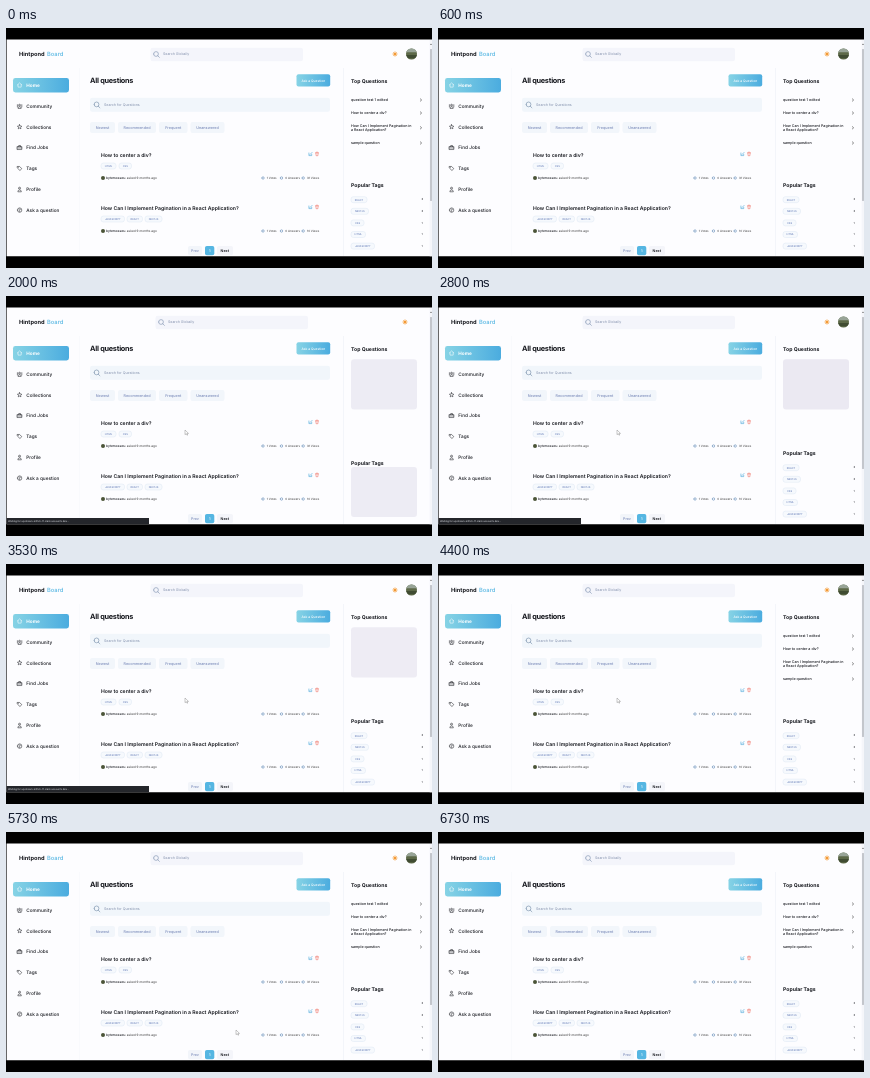
Write an HTML page that moves like this. It is 426 by 240 pixels and loops after 6.79 s.

```html
<!DOCTYPE html>
<html lang="en">
<head>
<meta charset="utf-8">
<title>Question board loading</title>
<style>
  html, body { margin: 0; width: 100%; height: 100%; overflow: hidden; background: #000; }
  svg { display: block; width: 100%; height: 100%; }
  text { font-family: Inter, sans-serif; text-rendering: geometricPrecision; white-space: pre; }
  .icon { fill: none; stroke-width: .6; stroke-linecap: round; stroke-linejoin: round; }
</style>
</head>
<body>
<svg id="stage" viewBox="0 0 426 240"></svg>
<script>
const LOOP = 6790;
const INK = '#15171d', BLUE = '#55b6e2', PAPER = '#fdfdff';

const text = (x, y, s, size, weight = 500, fill = INK, extra = '') =>
  `<text x="${x}" y="${y}" font-size="${size}" font-weight="${weight}" fill="${fill}" ${extra}>${s}</text>`;
const centred = (x, y, s, size, weight, fill) => text(x, y, s, size, weight, fill, 'text-anchor="middle"');
const box = (x, y, w, h, fill, r = 0, extra = '') =>
  `<rect x="${x}" y="${y}" width="${w}" height="${h}" rx="${r}" fill="${fill}" ${extra}/>`;
const icon = (x, y, d, color = '#333', size = 1) =>
  `<path class="icon" transform="translate(${x} ${y}) scale(${size})" d="${d}" stroke="${color}"/>`;
const group = (id, body) => `<g id="${id}">${body}</g>`;

const ring = r => `M${-r} 0a${r} ${r} 0 1 0 ${2 * r} 0a${r} ${r} 0 1 0 ${-2 * r} 0`;
const lens = ring(2.4) + 'M1.8 1.8L3.4 3.4';

function pill(x, y, w, label) {
  return box(x, y, w, 6, '#f6f9fd', 2.4, 'stroke="#dde6f2" stroke-width=".5"') +
    centred(x + w / 2, y + 3.95, label, 2.55, 500, '#7187bd');
}

function menu() {
  const items = [
    ['Home', 57, 'M-2.5 0L0-2.4L2.5 0M-1.8-.5V2.4H1.8V-.5'],
    ['Community', 78, 'M-1-1a1 1 0 1 0 2 0a1 1 0 1 0-2 0M-1.8 2.3V1.5Q0 0 1.8 1.5V2.3ZM-2.5-1.5V1M2.5-1.5V1'],
    ['Collections', 98.8, 'M0-2.4L.8-.8L2.5-.6L1.2.6L1.5 2.3L0 1.4L-1.5 2.3L-1.2.6L-2.5-.6L-.8-.8Z'],
    ['Find Jobs', 119.6, 'M-2.5-1.2H2.5V2.2H-2.5ZM-1-1.2V-2.4H1V-1.2M-2.5.4H2.5'],
    ['Tags', 140.4, 'M-2.4-2.2H0L2.5.3L.4 2.4L-2.4-.3ZM-1.4-1.2h.1'],
    ['Profile', 161.3, 'M-1.1-1.3a1.1 1.1 0 1 0 2.2 0a1.1 1.1 0 1 0-2.2 0M-2 2.4Q-2 .7 0 .7T2 2.4Z'],
    ['Ask a question', 182.1, ring(2.5) + 'M-.8-.7Q0-1.8.8-.7Q.8 0 0 .4M0 1.4v.1']
  ];
  return box(7, 50, 56, 14.4, 'url(#blue)', 2.4) + items.map(([label, y, d], i) => {
    const color = i ? INK : '#fff';
    return icon(13.6, y, d, color, .88) + text(20.3, y + 1.7, label, 4.7, i ? 500 : 700, color);
  }).join('');
}

function question(y, title, tags, stats) {
  const info = [[257, `${stats[0]} Votes`], [275.5, `${stats[1]} Answers`], [297.2, `${stats[2]} Views`]];
  return text(95, y + 1.9, title, 5.13, 600) +
    icon(304.5, y - 1, 'M-1.6-1V1.6H1.2V.3M-.6.6L1.6-1.6', '#48a6d8') +
    icon(311, y - 1, 'M-1.5-1.1H1.5M-1.1-1.1L-.9 1.7H.9L1.1-1.1M-.5-1.8H.5', '#ef7469') +
    tags.map(([x, w, s]) => pill(x, y + 8, w, s)).join('') +
    `<circle cx="97" cy="${y + 23}" r="2" fill="#4b5438"/>` +
    text(100, y + 24.1, 'bytemosses', 3.25, 500) +
    text(118.2, y + 24.1, '• asked 9 months ago', 3.15, 400, '#333') +
    info.map(([x, s]) =>
      icon(x, y + 23, ring(1.2), '#5f89b6') + text(x + 3.8, y + 24.1, s, 2.95, 400, '#333')).join('');
}

function topQuestions() {
  const rows = [
    [72, 'question test 1 edited'], [85, 'How to center a div?'],
    [97.3, 'How Can I Implement Pagination in'], [115, 'sample question']
  ];
  return rows.map(([y, s], i) => text(345, y + 1.2, s, 3.65) +
    icon(415, y + (i === 2 ? 2.5 : 0), 'M-.6-1.1L.6 0L-.6 1.1')).join('') +
    text(345, 103, 'a React Application?', 3.65);
}

const popularTags = () =>
  [['REACT', 16], ['NEXTJS', 17.5], ['CSS', 13], ['HTML', 14.5], ['JAVASCRIPT', 23.5]]
    .map(([s, w], i) => pill(345, 168.7 + i * 11.6, w, s) + text(415.5, 172.3 + i * 11.6, i < 2 ? 2 : 1, 2.8, 400)).join('');

const filters = () =>
  [[84, 25, 'Newest'], [112, 38, 'Recommended'], [153, 28.5, 'Frequent'], [184.5, 34, 'Unanswered']]
    .map(([x, w, s]) => box(x, 94, w, 11, '#f2f6fb', 2) + centred(x + w / 2, 100.8, s, 3.75, 500, '#7d8dbb')).join('');

const rays = Array.from({ length: 8 }, (_, i) => {
  const c = Math.cos(i * Math.PI / 4), s = Math.sin(i * Math.PI / 4);
  return `M${1.7 * c} ${1.7 * s}L${2.3 * c} ${2.3 * s}`;
}).join('');

const skeleton = (id, x, y, w, h) => box(x, y, w, h, '#ebe9f2', 3, `id="${id}" class="skeleton"`);

stage.innerHTML = `
  <defs>
    <linearGradient id="blue"><stop stop-color="#86d3e5"/><stop offset="1" stop-color="#4bacdf"/></linearGradient>
    <clipPath id="page"><rect x=".6" y="11.6" width="425.4" height="216.7"/></clipPath>
  </defs>
  <rect width="426" height="240"/>
  <g clip-path="url(#page)">` +
  box(0, 11, 426, 218, PAPER) +
  box(73, 40, .4, 188, '#f3f4f9') +
  text(13, 28, 'Hintpond', 5.7, 700) + text(41, 28, 'Board', 5.8, 500, BLUE) +
  group('globalSearch', box(144.5, 19.7, 152.5, 13.6, '#f4f5fb', 2.2) +
    icon(150, 26, lens, '#7b8fae') + text(157, 27.3, 'Search Globally', 3.55, 400, '#8390ac')) +
  group('theme',
    group('sun', '<circle r="1.5" fill="#f49a35"/>' + icon(0, 0, rays, '#f49a35')) +
    group('moon', '<path d="M1-2.2A2.4 2.4 0 1 1-2.3.8A2.8 2.8 0 0 0 1-2.2" fill="#ef8c35"/>')) +
  group('avatar', '<circle cx="405.5" cy="26" r="5.5" fill="#5d6948"/>' +
    '<path d="M400.3 24.2A5.5 5.5 0 0 1 410.7 24.2Z" fill="#98a497"/><path d="M400.1 27H410.9A5.5 5.5 0 0 1 409 30.2H402Z" fill="#404c32"/>') +
  menu() +
  group('header',
    text(84, 55.2, 'All questions', 7.3, 700, INK, 'letter-spacing="-.25"') +
    group('ask', box(290.5, 46.2, 33.7, 12.2, 'url(#blue)', 2) +
      centred(307.3, 53.5, 'Ask a Question', 3.3, 500, '#fff')) +
    box(84, 69.7, 240, 14, '#f1f6fb', 2.2, 'id="mainSearch"') +
    icon(90.5, 76.4, lens, '#7088a5') + text(98, 78, 'Search for Questions', 3.6, 400, '#8390ac') +
    filters()) +
  group('questions',
    question(127, 'How to center a div?', [[95, 15, 'HTML'], [113, 12.5, 'CSS']], [1, 0, 31]) +
    question(180, 'How Can I Implement Pagination in a React Application?',
      [[95, 23.5, 'JAVASCRIPT'], [121, 15.5, 'REACT'], [139, 17, 'NEXTJS']], [1, 0, 10]) +
    box(182, 218, 14, 9.3, '#f2f5fa', 1.8) + centred(189, 223.9, 'Prev', 3.65, 500, '#7d8dbb') +
    box(199, 218, 9.3, 9.3, BLUE, 1.8) + centred(203.7, 223.9, '1', 3.6, 600, '#fff') +
    box(211, 218, 16, 9.3, '#f4f5fa', 1.8) + centred(218.8, 223.9, 'Next', 3.7, 600)) +
  group('cards', skeleton('cardA', 84, 111.3, 244, 49.7) + skeleton('cardB', 84, 166.8, 244, 49.6)) +
  group('aside', box(337, 40, .5, 188, '#e8edf5') +
    text(345, 54.8, 'Top Questions', 5.15, 700) +
    group('tagTitle', text(345, 159, 'Popular Tags', 5.15, 700)) +
    group('topList', topQuestions()) + group('tagList', popularTags()) +
    skeleton('topLoad', 345, 63.3, 66, 50.2) + skeleton('tagLoad', 345, 171, 66, 50)) +
  group('scroll', box(423.7, 12, 2.3, 217, '#f5f6fa') + box(424.5, 21, 1, 152, '#92959d', .5) +
    '<path d="M424.1 17L425 15.5L425.9 17Z" fill="#666"/>') +
  group('status', box(0, 222, 143, 7, '#24262b') +
    text(2, 226, 'Waiting for upstream-kitfish-11.clerk.accounts.dev...', 2.5, 400, '#e5e7ec')) +
  group('cursor', '<path d="M0 0V4.7L1.2 3.7L2 5.3L2.7 5L2 3.4H3.5Z" fill="#fff" stroke="#777" stroke-width=".4"/>') +
  '</g>';

const el = id => document.getElementById(id);
const show = (id, on) => el(id).style.display = on ? '' : 'none';
const move = (id, x, y = 0) => el(id).setAttribute('transform', `translate(${x} ${y})`);

// Pointer stops: time, x, y
const path = [[720, 166, 4], [1130, 173, 99], [1500, 179, 134], [4750, 179, 134],
  [5450, 230, 198], [5900, 230, 198], [6350, 246, 240]];

function pointer(t) {
  const i = path.findIndex(p => p[0] > t);
  if (i < 1) return [0, -20];
  const [a, b] = [path[i - 1], path[i]];
  const u = (t - a[0]) / (b[0] - a[0]), e = u * u * (3 - 2 * u);
  return [a[1] + (b[1] - a[1]) * e, a[2] + (b[2] - a[2]) * e];
}

function draw(t) {
  const loading = t >= 800 && t < 1600;
  const signedOut = t >= 800 && t < 2700;
  const waiting = t >= 800 && t < 3900;
  const shift = loading ? 4 : 0;

  show('questions', !loading);
  show('cards', loading);
  show('avatar', !signedOut);
  show('topList', !waiting);
  show('topLoad', waiting);
  show('tagList', !signedOut);
  show('tagLoad', signedOut);
  show('scroll', !loading);
  show('status', waiting && t >= 950);
  show('sun', !loading);
  show('moon', loading);

  move('globalSearch', loading ? 10 : signedOut ? 5 : 0);
  move('theme', loading ? 408.5 : signedOut ? 399 : 389, 26);
  move('header', 0, loading ? 3 : 0);
  move('ask', shift);
  move('aside', shift);
  move('tagTitle', 0, signedOut ? 10 : 0);
  el('mainSearch').setAttribute('width', 240 + shift);
  move('cursor', ...pointer(t));

  const pulse = .9 + .1 * Math.cos((t - 800) * Math.PI / 1000);
  document.querySelectorAll('.skeleton').forEach(s => s.style.opacity = pulse);
}

const start = performance.now();
function tick() {
  draw((performance.now() - start) % LOOP);
  requestAnimationFrame(tick);
}
tick();
</script>
</body>
</html>
```
